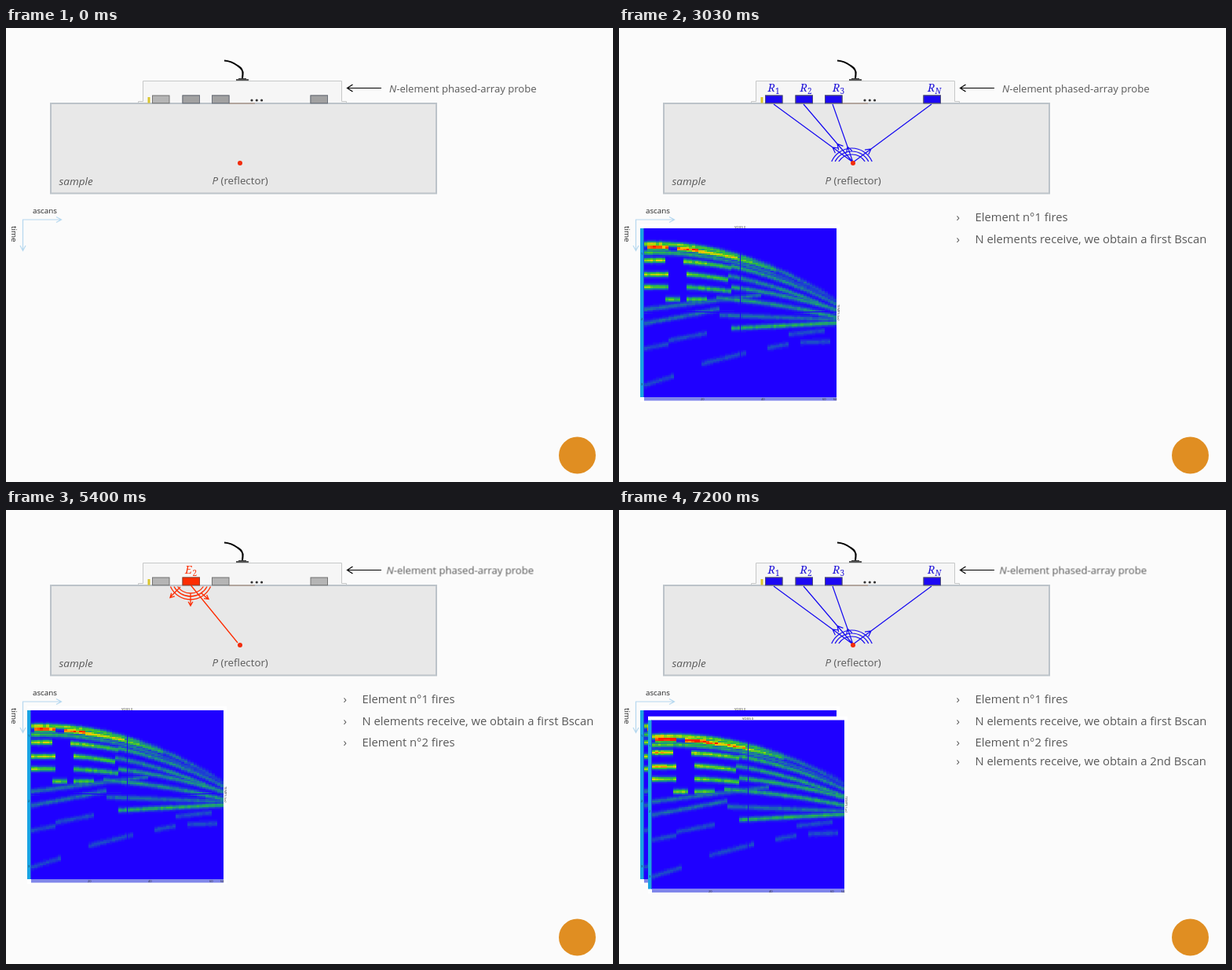
These frames come from a looping animation (773x578 px, 8000 ms). An HTML page:

```html
<!DOCTYPE html>
<html lang="en">
<head>
<meta charset="utf-8">
<title>Phased-array acquisition</title>
<style>
  html, body { margin: 0; width: 100%; height: 100%; overflow: hidden; background: #fbfbfb; }
  svg { display: block; width: 773px; height: 578px; }
  text { font-family: "Open Sans", "Noto Sans", sans-serif; fill: #595959; }
  .i { font-style: italic; }
  .label { font-size: 13.1px; }
  .axis { font-size: 9.8px; fill: #222; }
  .list text { font-size: 14.8px; }
  .tiny { font-size: 4px; fill: #333; }
  .math { font: italic 14px "Noto Serif", "Liberation Serif", serif; fill: inherit; }
  .sub { font-size: 10px; }
  .up { font-style: normal; }
  .line { fill: none; }
  .fire { stroke: #fd2c02; fill: #fd2c02; stroke-width: 1.3; }
  .echo { stroke: #1408f0; fill: #1c10d8; stroke-width: 1.2; }
  .fire text, .echo text { stroke: none; }
</style>
</head>
<body>
<svg id="stage" viewBox="0 0 773 578" xmlns="http://www.w3.org/2000/svg">
  <rect width="773" height="578" fill="#fbfbfb"/>

  <g id="probe">
    <path d="M278 41.5C286 42 291 45 295 48C300 51 302 55 301.5 59L301 64" class="line" stroke="#000" stroke-width="2.1"/>
    <path d="M168.500 96V93.500H174.500V67.500H427.500V93.500H433.500V96" fill="#f6f6f6" stroke="#c6c8c8"/>
    <path d="M293 66H309" stroke="#555" stroke-width="2"/>
    <path d="M296 64.500H306" stroke="#333"/>
  </g>

  <rect x="57" y="96" width="491" height="114.500" fill="#e8e8e8" stroke="#bcc3c9" stroke-width="2"/>
  <path d="M284 96H317" stroke="#a98872"/>
  <rect x="180.500" y="88" width="3" height="7.500" fill="#d9c52c"/>
  <g id="elements"></g>
  <g fill="#333">
    <circle cx="313" cy="92" r="1.600"/><circle cx="319.300" cy="92" r="1.600"/><circle cx="325.600" cy="92" r="1.600"/>
  </g>
  <path d="M478 76.500H436" stroke="#000" stroke-width="1.200"/>
  <path d="M441.500 72L434.500 76.500L441.500 81" class="line" stroke="#000" stroke-width="1.200"/>
  <text id="probeLabel" class="label" x="488" y="82"><tspan class="i">N</tspan>-element phased-array probe</text>
  <text class="label i" x="67.500" y="199.500" style="font-size:13.5px">sample</text>
  <text class="label" x="262.500" y="199" style="font-size:13.3px"><tspan class="i">P</tspan> (reflector)</text>

  <g id="scans"></g>

  <path d="M21.500 283V244H70M64 240.500L70.500 244L64 247.500M18 277L21.500 283.500L25 277" class="line" stroke="#b6d8ef" stroke-width="1.200"/>
  <text class="axis" x="34" y="235.500">ascans</text>
  <text class="axis" transform="translate(7 252) rotate(90)">time</text>

  <g id="shots"></g>
  <circle cx="298" cy="172" r="3" fill="#f22c0c"/>
  <g id="list" class="list"></g>
  <circle cx="727.500" cy="544" r="23.500" fill="#e08e22"/>
</svg>

<script>
const LOOP = 8000;
const $ = id => document.getElementById(id);

function add(parent, tag, attrs = {}, text) {
  const el = document.createElementNS("http://www.w3.org/2000/svg", tag);
  for (const k in attrs) el.setAttribute(k, attrs[k]);
  if (text) el.textContent = text;
  parent.appendChild(el);
  return el;
}

// steps: [time, value]; equal neighbouring times make a hard change
function run(el, prop, steps) {
  const frames = steps.map(([t, v]) => ({ offset: t / LOOP, [prop]: v }));
  el.animate(frames, { duration: LOOP, iterations: Infinity });
}

const jump = (t, a, b) => [[t, a], [t, b]];
const FADE = [6840, 7200];
const fade = (a, b) => [[FADE[0], a], [FADE[1], b]];
const show = (el, ...parts) => {
  const mid = parts.flat();
  run(el, "opacity", [[0, mid[0][1]], ...mid, [LOOP, mid[mid.length - 1][1]]]);
};

// Probe elements
const xs = [186.5, 225, 262.5, 388];
const element = (parent, x, fill, stroke) =>
  add(parent, "rect", { x, y: 86, width: 21.5, height: 9.7, fill, stroke, "stroke-width": 1 });

xs.forEach(x => element($("elements"), x, "#b5b5b5", "#737373"));
const dark = add($("elements"), "g");
xs.slice(1).forEach(x => element(dark, x, "#a1a1a1", "#6c727c"));
show(dark, jump(4500, 1, 0));

// Open arrow head with its tip at x, y
function head(x, y, angle, size = 6) {
  const at = d => `${x - size * Math.cos(angle + d)} ${y - size * Math.sin(angle + d)}`;
  return `M${at(0.5)}L${x} ${y}L${at(-0.5)}`;
}

// Concentric arcs; side 1 opens downwards, -1 upwards
function waves(cx, cy, edge, side) {
  return [20, 24, 28].map(r => {
    const h = Math.abs(edge - cy);
    const w = Math.sqrt(r * r - h * h);
    return `M${cx - w} ${edge}A${r} ${r} 0 0 ${side > 0 ? 0 : 1} ${cx + w} ${edge}`;
  }).join("");
}

function math(parent, x, y, letter, sub, gap, subItalic) {
  add(parent, "text", { x, y, class: "math" }, letter);
  add(parent, "text", { x: x + gap, y: y + 3, class: "math sub" + (subItalic ? "" : " up") }, sub);
}

function fire(n, x, tip) {
  const g = add($("shots"), "g", { class: "fire" });
  element(g, xs[n - 1], "#fd2c02", "#a23a22");
  const c = x - 0.5;
  let d = waves(c, 86, 97.5, 1) + `M${c} 106V121` + head(c, 122, Math.PI / 2);
  d += `M${c - 13} 98L${c - 26} 111` + head(c - 26, 111.5, 2.35);
  d += `M${c + 14} 106L${c + 22} 113` + head(c + 23, 113.5, 0.66);
  d += `M${x} 96L${tip[0]} ${tip[1]}`;
  add(g, "path", { d, class: "line" });
  math(g, x - 7.5, 81, "E", n, 9.5);
  return g;
}

function echo() {
  const g = add($("shots"), "g", { class: "echo" });
  let d = waves(296.5, 181, 170, -1);
  const tips = [272, 278, 291, 321];
  const subs = ["1", "2", "3", "N"];
  [197, 235, 272, 398].forEach((x, i) => {
    element(g, xs[i], "#1c08f4", "#4a4a78");
    const slope = (97 - 171) / (x - 298);
    const tx = tips[i];
    d += `M298 171L${x} 97` + head(tx, 171 + (tx - 298) * slope, Math.atan2(-74, x - 298), 8);
    math(g, [189.5, 230.5, 272, 393][i], 81, "R", subs[i], 9.5, i === 3);
  });
  add(g, "path", { d, class: "line" });
  return g;
}

// B-scan
const COLS = 64, ROWS = 107, W = 245, H = 215, LEVELS = 24;

// from, to, depth, curvature, strength at start, strength at end
const arcs = [
  [0, 245, 20, 1.35, .72, .16], [2, 32, 24, 1, 1, 1], [42, 70, 25, 1, 1, .95],
  [70, 120, 26, 1.1, .85, .72], [120, 170, 27, 1.1, .6, .4], [0, 245, 31, 1.2, .52, .14],
  [0, 28, 41, 0, .75, .65], [50, 110, 41, 1, .62, .5], [110, 245, 38, 1.1, .42, .3],
  [0, 30, 59, 0, .7, .65], [55, 108, 57, 1, .6, .5], [108, 245, 52, 1, .35, .36],
  [0, 30, 75, 0, .65, .55], [52, 110, 74, .7, .55, .45], [110, 245, 69, .65, .4, .38],
  [26, 46, 91, 0, .6, .55], [52, 82, 91, 0, .55, .5], [90, 245, 86, .5, .38, .38]
];
// from, to, depth at start, depth at end
const streaks = [
  [112, 245, 127, 120], [0, 150, 104, 85], [0, 95, 121, 103], [95, 245, 110, 116],
  [30, 80, 143, 133], [0, 30, 153, 147], [72, 130, 173, 158], [0, 38, 200, 188],
  [158, 184, 152, 147], [200, 236, 145, 144], [183, 228, 135, 130]
];
const ramp = [
  [0, 31, 0, 255], [.2, 28, 72, 205], [.38, 28, 150, 130], [.52, 50, 195, 50],
  [.66, 170, 215, 10], [.78, 245, 200, 0], [.88, 255, 110, 0], [1, 255, 30, 0]
];

function colour(v) {
  const i = Math.max(1, ramp.findIndex(s => s[0] >= v));
  const a = ramp[i - 1], b = ramp[i];
  const k = (v - a[0]) / (b[0] - a[0]);
  return `rgb(${[1, 2, 3].map(c => Math.round(a[c] + (b[c] - a[c]) * k))})`;
}

function noise(a, b, seed) {
  const s = Math.sin(a * 12.9898 + b * 78.233 + seed * 37.719) * 43758.5453;
  return s - Math.floor(s);
}

function strength(u, v, col, o) {
  let best = 0;
  const put = (depth, amp, width, id) => {
    const z = (v - depth) / width;
    const grain = 0.84 + 0.26 * noise(col, id, o.seed);
    best = Math.max(best, amp * grain * Math.exp(-z * z));
  };
  arcs.forEach(([from, to, depth, bend, a, b], id) => {
    if (u < from || u > to) return;
    const k = (u - from) / (to - from);
    const c = depth + bend * o.bend * (u - o.peak) ** 2 / 1000;
    put(c + o.lift, (a + (b - a) * k) * o.gain, 3.3, id);
  });
  streaks.forEach(([from, to, a, b], id) => {
    if (u < from || u > to) return;
    const c = a + (b - a) * (u - from) / (to - from);
    put(c + o.lift, id ? (id < 4 ? .29 : .21) : .45, 3.2, id + 40);
  });
  return Math.min(1, best);
}

function scan(x, y, o) {
  const g = add($("scans"), "g", { transform: `translate(${x} ${y})` });
  const box = (bx, by, width, height, fill) => add(g, "rect", { x: bx, y: by, width, height, fill });
  box(-5, -5, W + 9, H + 11, "#fff");
  box(0, 0, W, H, "#1f00ff");
  box(-5, 0, 5, H, "#18a4e4");
  box(-1, 0, 1, H, "#2450d8");
  box(0, H, W, 4.5, "#8086ea");
  const paths = Array(LEVELS + 1).fill("");
  const cw = W / COLS, ch = H / ROWS;
  for (let c = 0; c < COLS; c++) for (let r = 0; r < ROWS; r++) {
    const s = strength((c + .5) * cw, (r + .5) * ch, c, o);
    const level = Math.round(s * LEVELS);
    if (level) paths[level] += `M${(c * cw).toFixed(2)} ${(r * ch).toFixed(2)}h${cw}v${ch}h${-cw}z`;
  }
  paths.forEach((d, i) => d && add(g, "path", { d, fill: colour(i / LEVELS), "shape-rendering": "crispEdges" }));
  const tiny = (text, tx, ty, turn = 0) =>
    add(g, "text", { class: "tiny", transform: `translate(${tx} ${ty}) rotate(${turn})` }, text);
  tiny("VOIES 0", 115, -.5);
  tiny("TEMPS (us)", 245.5, 97, 90);
  ["20", "40", "60", "64"].forEach((t, i) => tiny(t, [72, 149, 227, 241][i], H + 4));
  [33, 116, 199].forEach((ty, i) => tiny(i + 1, -4, ty + 1));
  return g;
}

const first = scan(32, 255, { seed: 1, peak: 13, bend: 1, lift: 0, gain: 1 });
const second = scan(42, 267.5, { seed: 5, peak: 24, bend: .93, lift: 0, gain: 1.13 });
const fire1 = fire(1, 196, [298, 171]);
const fire2 = fire(2, 235.5, [295, 169]);
const echo1 = echo();
const echo2 = echo();

const lines = [
  ["Element n°1 fires", 246], ["N elements receive, we obtain a first Bscan", 274],
  ["Element n°2 fires", 300.5], ["N elements receive, we obtain a 2nd Bscan", 324.5]
].map(([text, y]) => {
  const g = add($("list"), "g");
  add(g, "text", { x: 429.5, y }, "›");
  add(g, "text", { x: 453.5, y }, text);
  return g;
});

show(lines[0], jump(1530, 0, 1));
show(fire1, jump(1530, 0, 1), jump(3030, 1, 0));
[echo1, first, lines[1]].forEach(el => show(el, jump(3030, 0, 1)));
show(echo1, jump(3030, 0, 1), jump(4500, 1, 0));
show(lines[2], jump(4500, 0, 1));
show(fire2, jump(4500, 0, 1), fade(1, 0));
[echo2, second, lines[3]].forEach(el => show(el, fade(0, 1)));
run($("probeLabel"), "transform", [
  [0, "translate(0px, 0px)"], ...jump(4500, "translate(0px, 0px)", "translate(-3.5px, -0.5px)"),
  [LOOP, "translate(-3.5px, -0.5px)"]
]);
</script>
</body>
</html>
```
